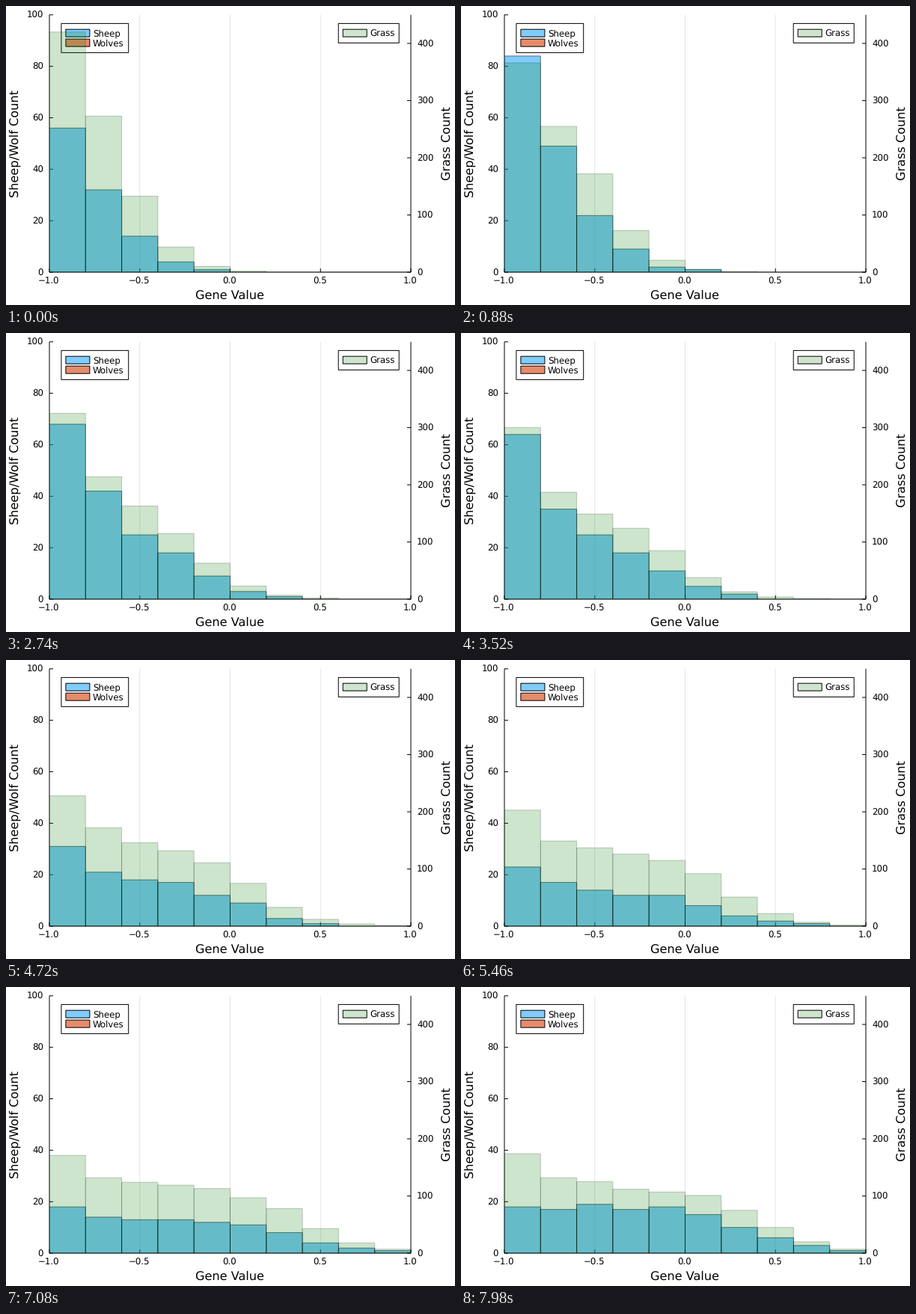
A matplotlib script that plays this animation: 600 by 400 pixels, repeating every 8 s.

```python
import numpy as np
import matplotlib.pyplot as plt
from matplotlib.animation import FuncAnimation
from matplotlib.patches import Rectangle

W, H, DPI = 600, 400, 100
FRAMES, STEP = 400, 20
LEFT, RIGHT, TOP, BASE = 58, 541, 11.8, 356.1
BINS = 10
BIN_W = (RIGHT - LEFT) / BINS
PX = 72 / DPI
BLUE, ORANGE, GREEN = "#009af9", "#e26f46", "#008000"
GRASS_TOTAL = 900
FLOCK_PERIOD, FLOCK_SWING, FLOCK_LOW = 40.5, 0.4, 236

plt.rcParams.update({
    "font.family": "DejaVu Sans",
    "text.hinting": "none",
    "path.snap": False,
})

K = np.arange(BINS)
rng = np.random.default_rng(7)
PHASE = rng.uniform(0, 2 * np.pi, (2, BINS))
SPEED = rng.uniform(0.2, 0.5, (2, BINS))


def spread(reach, slope, pile):
    """Share of each bin: a plateau out to reach, piled up at the left end."""
    w = (1 + pile * np.exp(-K)) / (1 + np.exp((K - reach) / slope))
    return w / w.sum()


def drift(i):
    """How far the genes have spread and how soft the front is."""
    return min(1.8 + 0.0143 * i, 6.6), 0.65 + 0.0006 * i


def wobble(i, kind, amount):
    return 1 + amount * np.sin(SPEED[kind] * i + PHASE[kind])


def grass_counts(i):
    pile = 0.5 + 0.75 * np.exp(-((i - 165) / 70) ** 2)
    share = spread(*drift(i), pile)
    return np.round(GRASS_TOTAL * share * wobble(i, 0, 0.03))


def flock_size(i):
    """Boom and bust around a slowly changing mean."""
    mean = np.interp(i, [0, 44, 98, 176, 236, 309, 399],
                     [124, 165, 127, 115, 188, 88, 207])
    turn = 2 * np.pi * (i - FLOCK_LOW) / FLOCK_PERIOD
    return mean * (1 - FLOCK_SWING * np.cos(turn))


def sheep_counts(i):
    reach, slope = drift(i)
    pile = np.interp(i, [0, 44, 176, 236, 309, 399], [0.7, 2, 2, 0.8, 0.8, 0])
    share = spread(reach - 0.2, slope, pile)
    return np.round(flock_size(i) * share * wobble(i, 1, 0.06))


fig = plt.figure(figsize=(W / DPI, H / DPI), dpi=DPI, facecolor="white")
ax = fig.add_axes([0, 0, 1, 1])
ax.set_xlim(0, W)
ax.set_ylim(H, 0)
ax.axis("off")
view = Rectangle((LEFT, BASE), RIGHT - LEFT, TOP - BASE,
                 transform=ax.transData)


def line(x0, y0, x1, y1, z, alpha=1):
    ax.plot([x0, x1], [y0, y1], color="black", alpha=alpha, lw=PX, zorder=z,
            solid_capstyle="butt")


def box(x, y, w, h, z, face="white", alpha=1, edge_alpha=1):
    patch = Rectangle((x, y), w, h, fc=(face, alpha), ec=("black", edge_alpha),
                      lw=PX, zorder=z, joinstyle="miter")
    return ax.add_patch(patch)


def label(x, y, s, size=11.8, ha="center", rotation=0):
    ax.text(x, y, s, fontsize=size * PX, ha=ha, va="baseline",
            rotation=rotation, rotation_mode="anchor", zorder=7)


def bars(face, alpha, z):
    patches = [box(LEFT + k * BIN_W, BASE, BIN_W, 0, z, face, alpha, alpha)
               for k in K]
    for patch in patches:
        patch.set_clip_path(view)
    return patches


def legend(x, w, entries):
    box(x, 23.4, w, 13 + 13 * len(entries), 4)
    for k, (name, color, alpha) in enumerate(entries):
        y = 31.2 + 13 * k
        box(x + 6, y, 32, 10, 4.5, color, alpha)
        label(x + 42, y + 9.5, name, ha="left")


# Axes
line(LEFT, TOP, LEFT, BASE, 1)
line(RIGHT, TOP, RIGHT, BASE, 3)
line(LEFT, BASE, RIGHT, BASE, 3)
for k in range(5):
    x = LEFT + k * (RIGHT - LEFT) / 4
    if 0 < k < 4:
        line(x, TOP, x, BASE, 1, alpha=0.1)
    line(x, BASE, x, BASE - 5, 1)
    label(x - 0.6, 371.5, f"{k / 2 - 1:.1f}".replace("-", "\u2212"))
for n in range(0, 101, 20):
    y = BASE - n * (BASE - TOP) / 100
    line(LEFT, y, LEFT + 5, y, 1)
    label(50, y + 4.3, str(n), ha="right")
for n in range(0, 401, 100):
    y = BASE - n * (BASE - TOP) / 450
    line(RIGHT - 5, y, RIGHT, y, 3)
    label(549, y + 4.3, str(n), ha="left")
label(299.2, 392, "Gene Value", 16.1)
label(17, 184, "Sheep/Wolf Count", 16.1, rotation=90)
label(595, 184, "Grass Count", 16.1, rotation=90)

sheep_bars = bars(BLUE, 0.5, 2)
grass_bars = bars(GREEN, 0.2, 5)
legend(73.9, 89.8, [("Sheep", BLUE, 0.5), ("Wolves", ORANGE, 0.8)])
legend(444.2, 81, [("Grass", GREEN, 0.2)])


def set_heights(patches, counts, full):
    for patch, n in zip(patches, counts):
        patch.set_height(-n * (BASE - TOP) / full)


def update(i):
    set_heights(sheep_bars, sheep_counts(i), 100)
    set_heights(grass_bars, grass_counts(i), 450)
    return sheep_bars + grass_bars


anim = FuncAnimation(fig, update, frames=FRAMES, interval=STEP,
                     init_func=lambda: update(0), repeat=True,
                     repeat_delay=0, blit=False)
plt.show()
```
